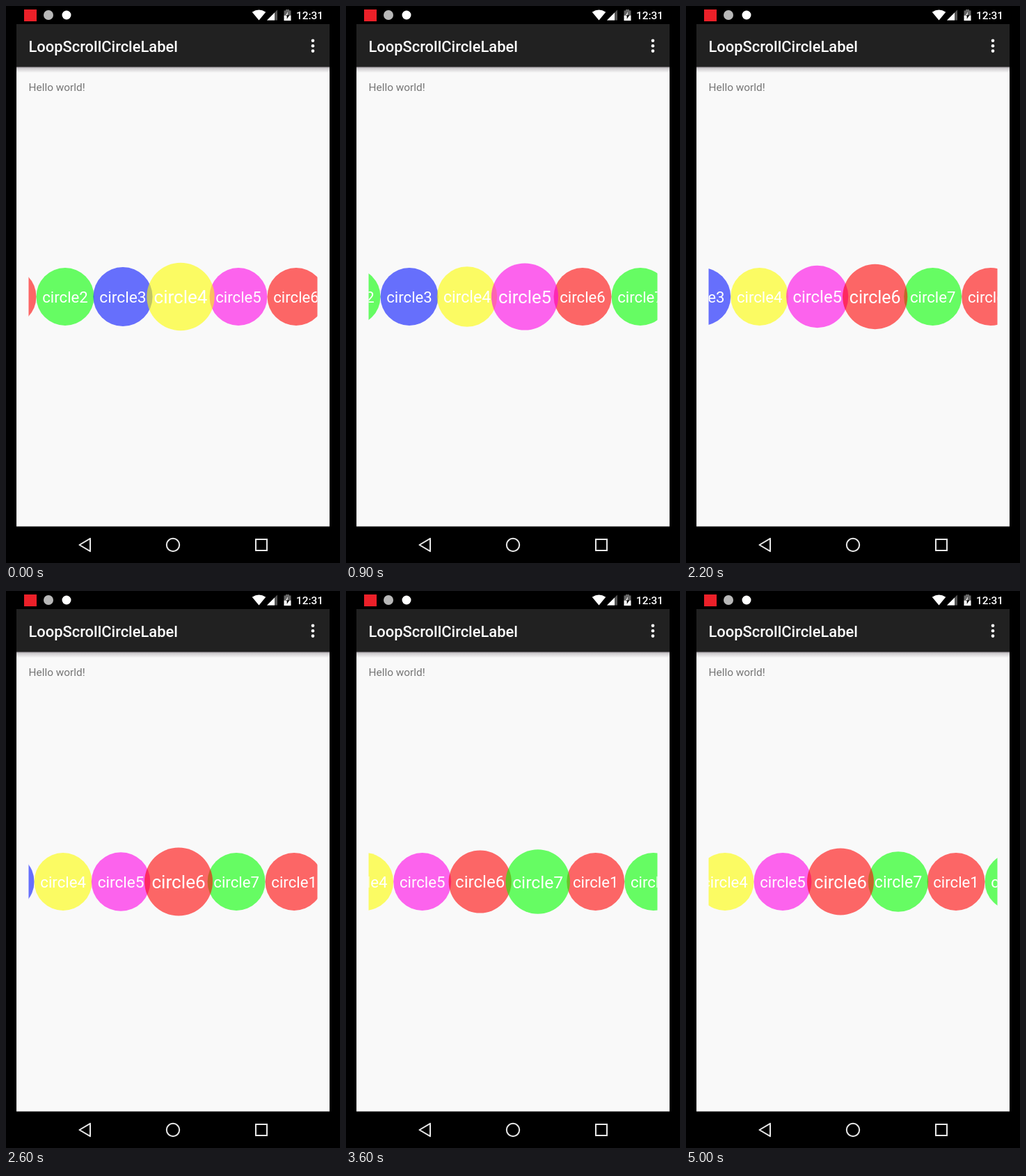
An HTML page with a canvas for the animation above (5.1 s loop, 480 by 800 pixels).

```html
<!DOCTYPE html>
<html lang="en">
<head>
<meta charset="utf-8">
<title>Circle label scroller</title>
<style>
  html, body { margin: 0; width: 100%; height: 100%; overflow: hidden; background: #000; }
  canvas { display: block; }
</style>
</head>
<body>
<canvas id="stage" width="480" height="800"></canvas>
<script>
const ctx = document.getElementById('stage').getContext('2d');
const LOOP = 5100, STEP = 100;
const COUNT = 7, GAP = 83, RADIUS = 41.5, GROWTH = 0.2;
const MID_X = 240, MID_Y = 417.5, LABEL_SIZE = 22.2;
const STRIP = { left: 32.5, right: 447.5 };
const FILLS = ['255,5,5', '5,255,0', '5,20,255', '253,253,0', '255,0,230'];

// [time in ms, x of the fourth circle's centre]
const PATH = [
  [0, 251], [900, 174], [1400, 143.6], [2200, 105.7],
  [3000, 58], [3600, 26.7], [4080, 4], [5000, 56]
];

const slope = (a, b) => (b[1] - a[1]) / (b[0] - a[0]);

function tangent(i) {
  const before = i > 0 ? slope(PATH[i - 1], PATH[i]) : null;
  const after = i < PATH.length - 1 ? slope(PATH[i], PATH[i + 1]) : null;
  if (before === null) return after;
  if (after === null) return before;
  return before * after < 0 ? 0 : (before + after) / 2;
}

function scrollAt(time) {
  let i = 0;
  while (i < PATH.length - 2 && time > PATH[i + 1][0]) i++;
  const [t0, x0] = PATH[i], [t1, x1] = PATH[i + 1];
  const span = t1 - t0, u = (time - t0) / span, v = 1 - u;
  return x0 * (1 + 2 * u) * v * v + x1 * u * u * (3 - 2 * u)
    + span * u * v * (tangent(i) * v - tangent(i + 1) * u);
}

function text(str, x, y, size, color, weight = 400, align = 'left') {
  ctx.font = `${weight} ${size}px Roboto, sans-serif`;
  ctx.textAlign = align;
  ctx.fillStyle = color;
  ctx.fillText(str, x, y);
}

function rect(x, y, w, h, color) {
  ctx.fillStyle = color;
  ctx.fillRect(x, y, w, h);
}

function disc(x, y, r, color) {
  ctx.fillStyle = color;
  ctx.beginPath();
  ctx.arc(x, y, r, 0, Math.PI * 2);
  ctx.fill();
}

function poly(color, ...points) {
  ctx.fillStyle = color;
  ctx.beginPath();
  points.forEach(([x, y]) => ctx.lineTo(x, y));
  ctx.closePath();
  ctx.fill();
}

function drawStatusBar() {
  rect(26, 5, 18, 17, '#ec2029');
  disc(61, 13, 7, '#b8b8b8');
  disc(87, 13, 6.5, '#fff');

  // Wi-Fi fan
  ctx.fillStyle = '#fff';
  ctx.beginPath();
  ctx.moveTo(363.5, 20.5);
  ctx.lineTo(353.7, 8.8);
  ctx.quadraticCurveTo(363.5, 2.2, 373.3, 8.8);
  ctx.fill();

  // Signal wedge
  poly('#555', [375, 20.5], [390, 20.5], [390, 5.5]);
  poly('#fff', [375, 20.5], [386, 20.5], [386, 9.5]);

  // Charging battery
  rect(402, 5, 5, 2, '#666');
  rect(399.5, 6.5, 10, 7, '#666');
  rect(399.5, 13.5, 10, 7.5, '#fff');
  poly('#fff', [405.3, 8], [401.5, 14.3], [404, 14.3]);
  poly('#000', [403.7, 18.8], [407.5, 13], [401.8, 13.5], [403.7, 14.6]);

  text('12:31', 417, 19, 15.4, '#fff', 500);
}

function drawAppBar() {
  const shadow = ctx.createLinearGradient(0, 87, 0, 96);
  shadow.addColorStop(0, 'rgba(40,28,40,.5)');
  shadow.addColorStop(0.3, 'rgba(40,28,40,.2)');
  shadow.addColorStop(1, 'rgba(40,28,40,0)');
  rect(15, 87, 450, 9, shadow);
  rect(15, 26, 450, 61.5, '#212121');
  text('LoopScrollCircleLabel', 32.5, 65.5, 21.9, '#fff', 500);
  for (const y of [49.8, 57.2, 64.6]) disc(441, y, 2.3, '#fff');
}

function drawNavBar() {
  ctx.strokeStyle = '#e8e8e8';
  ctx.lineWidth = 2;
  ctx.lineJoin = 'round';
  ctx.beginPath();
  ctx.moveTo(121, 764.8);
  ctx.lineTo(105.5, 774);
  ctx.lineTo(121, 783.2);
  ctx.closePath();
  ctx.stroke();
  ctx.beginPath();
  ctx.arc(240, 774, 9.2, 0, Math.PI * 2);
  ctx.stroke();
  ctx.lineJoin = 'miter';
  ctx.strokeRect(359, 766, 16, 16);
}

function drawCircles(scroll) {
  const circles = [];
  for (let slot = -4; slot <= 10; slot++) {
    const x = scroll + (slot - 3) * GAP;
    const distance = Math.abs(x - MID_X);
    if (distance > 255) continue;
    const index = (slot + COUNT) % COUNT;
    const scale = 1 + GROWTH * Math.max(0, 1 - distance / GAP);
    circles.push({ x, distance, index, scale });
  }
  // Circles nearest the middle lie on top.
  circles.sort((a, b) => b.distance - a.distance);

  ctx.save();
  ctx.beginPath();
  ctx.rect(STRIP.left, 360, STRIP.right - STRIP.left, 115);
  ctx.clip();
  for (const { x, index, scale } of circles) {
    const size = LABEL_SIZE * scale;
    disc(x, MID_Y, RADIUS * scale, `rgba(${FILLS[index % FILLS.length]},.6)`);
    text('circle' + (index + 1), x, MID_Y + size * 0.37, size, '#fff', 400, 'center');
  }
  ctx.restore();
}

function draw(time) {
  rect(0, 0, 480, 800, '#000');
  rect(15, 26, 450, 721.5, '#f9f9f9');
  drawStatusBar();
  drawAppBar();
  text('Hello world!', 32.5, 122, 15.4, '#757575');
  drawCircles(scrollAt(time));
  drawNavBar();
}

const start = performance.now();
function tick() {
  const time = (performance.now() - start) % LOOP;
  draw(Math.floor(time / STEP) * STEP);
  requestAnimationFrame(tick);
}
tick();
</script>
</body>
</html>
```
